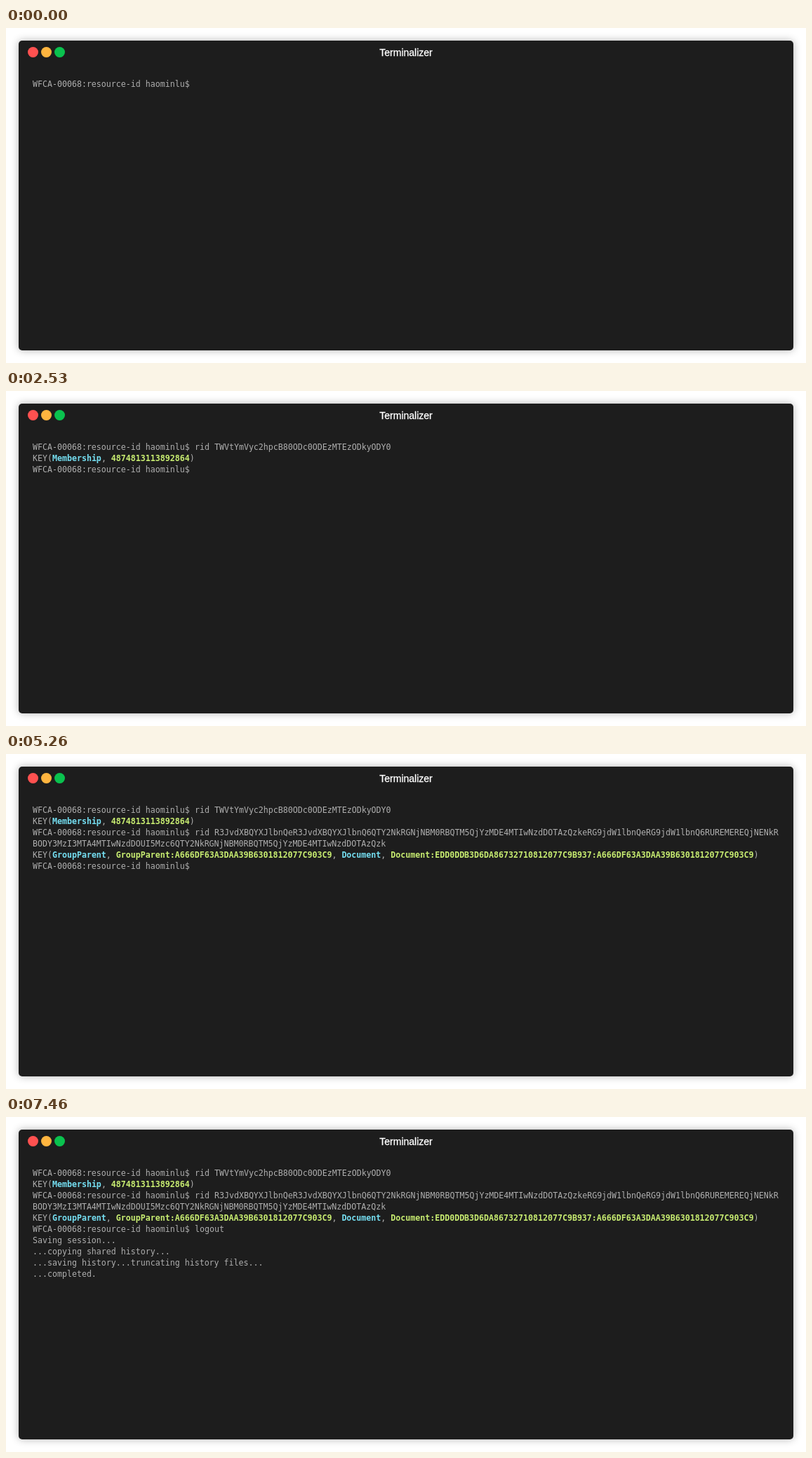
Write an HTML page that moves like this. It is 1140x478 px and loops after 9.46 s.

```html
<!DOCTYPE html>
<html lang="en">
<head>
<meta charset="utf-8">
<title>Terminal</title>
<style>
  html, body { margin: 0; width: 100%; height: 100%; overflow: hidden; background: #fff; }
  .window {
    position: absolute; left: 18px; top: 18px; width: 1104px; height: 442px;
    border-radius: 5px; background: #1d1d1d; box-shadow: 0 0 12px rgba(0, 0, 0, .3);
  }
  .dot { position: absolute; top: 9px; width: 15px; height: 15px; border-radius: 50%; }
  .title {
    position: absolute; left: 0; right: 0; top: 9px; text-align: center; color: #fff;
    font: 14px/16px "Liberation Sans", Arial, sans-serif; -webkit-text-stroke: .3px #fff;
  }
  .screen {
    position: absolute; left: 20px; top: 54px; color: #afafaf; white-space: pre;
    font: 11.627px/16px "DejaVu Sans Mono", monospace;
  }
  .part { position: absolute; }
  b { color: #75dff2; }
  b.id { color: #c8ed71; }
</style>
</head>
<body>
<div class="window">
  <div class="dot" style="left: 13px; background: #ff5150"></div>
  <div class="dot" style="left: 32px; background: #ffb53f"></div>
  <div class="dot" style="left: 51px; background: #0ac24e"></div>
  <div class="title">Terminalizer</div>
  <div class="screen" id="screen"></div>
</div>
<script>
const LOOP = 9460, ROW = 16, COL = 7;
const PROMPT = 'WFCA-00068:resource-id haominlu$ ';
const INPUT = PROMPT.length;
const GROUP = 'A666DF63A3DAA39B6301812077C903C9';
const DOC = 'EDD0DDB3D6DA86732710812077C9B937';

const kind = text => `<b>${text}</b>`;
const id = text => `<b class="id">${text}</b>`;
const key = (...parts) => `KEY(${parts.join(', ')})`;

// [time, row, column, content]
const steps = [
  [0, 0, 0, PROMPT],
  [2000, 0, INPUT, 'rid TWVtYmVyc2hpcB80ODc0ODEzMTEzODkyODY0'],
  [2410, 1, 0, key(kind('Membership'), id('4874813113892864'))],
  [2530, 2, 0, PROMPT],
  [4530, 2, INPUT, 'rid R3JvdXBQYXJlbnQeR3JvdXBQYXJlbnQ6QTY2NkRGNjNBM0RBQTM5QjYzMDE4MTIwNzdDOTAzQzkeRG9jdW1lbnQeRG9jdW1lbnQ6RUREMEREQjNENkR'],
  [4530, 3, 0, 'BODY3MzI3MTA4MTIwNzdDOUI5Mzc6QTY2NkRGNjNBM0RBQTM5QjYzMDE4MTIwNzdDOTAzQzk'],
  [5130, 4, 0, key(kind('GroupParent'), id('GroupParent:' + GROUP), kind('Document'), id(`Document:${DOC}:${GROUP}`))],
  [5260, 5, 0, PROMPT],
  [7260, 5, INPUT, 'logout'],
  [7260, 6, 0, 'Saving session...'],
  [7360, 7, 0, '...copying shared history...'],
  [7360, 8, 0, '...saving history...truncating history files...'],
  [7460, 9, 0, '...completed.']
];

const screen = document.getElementById('screen');
for (const [time, row, col, html] of steps) {
  const part = document.createElement('div');
  part.className = 'part';
  part.style.left = col * COL + 'px';
  part.style.top = row * ROW + 'px';
  part.innerHTML = html;
  screen.append(part);
  if (time) {
    part.animate([
      { visibility: 'hidden', offset: 0, easing: 'step-end' },
      { visibility: 'visible', offset: time / LOOP },
      { visibility: 'visible', offset: 1 }
    ], { duration: LOOP, iterations: Infinity });
  }
}
</script>
</body>
</html>
```
